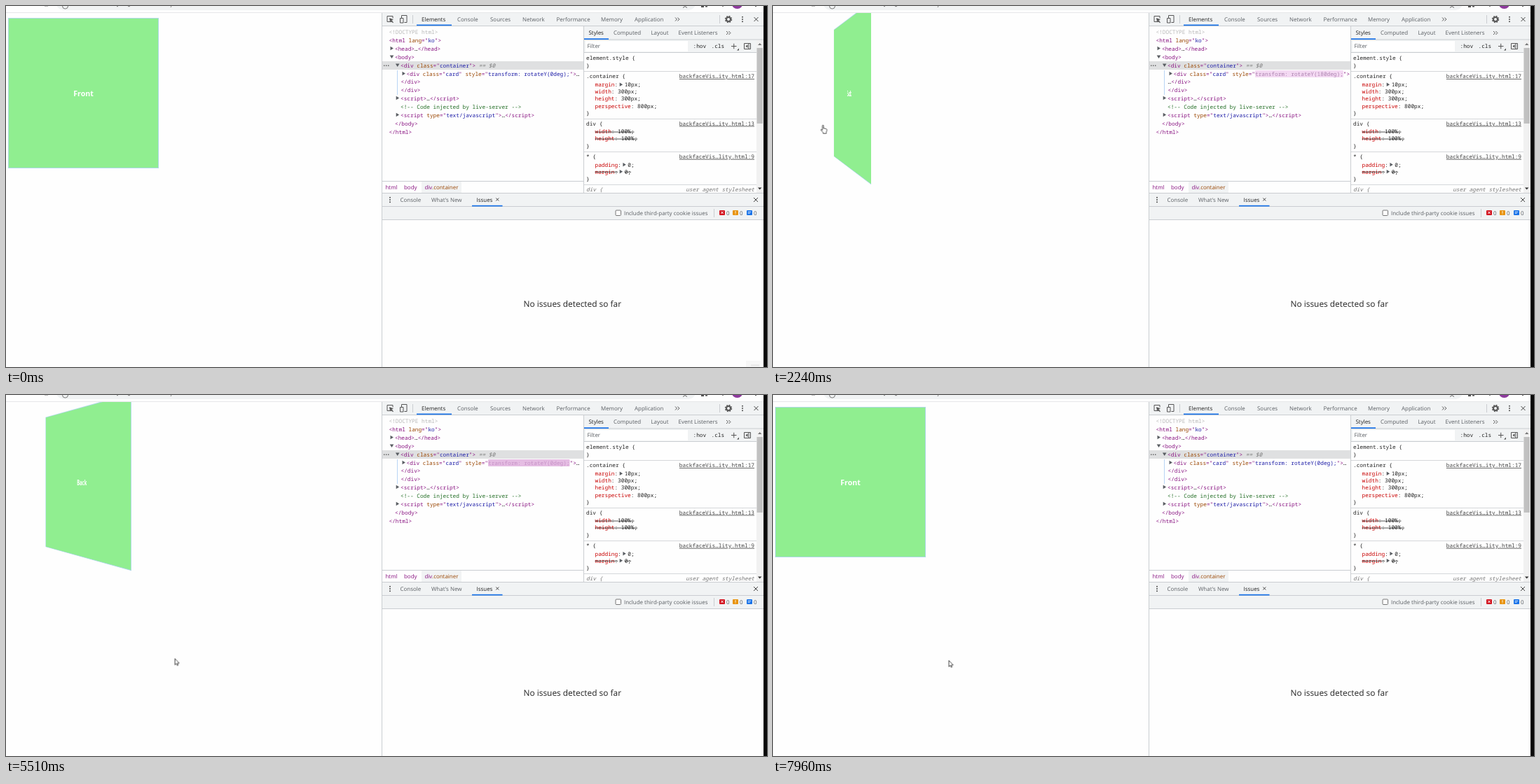
An HTML page for the animation above (8 s loop, 1086 by 516 pixels).

```html
<!DOCTYPE html>
<html lang="en">
<head>
<meta charset="utf-8">
<title>Card flip</title>
<style>
  html, body { margin: 0; width: 100%; height: 100%; overflow: hidden; background: #fefefe; }
  #page { position: absolute; left: 0; top: 9px; width: 536px; height: 507px; overflow: hidden;
    perspective: 573px; perspective-origin: 109px 115.5px; }
  #card { position: absolute; left: 3px; top: 8px; width: 215px; height: 215px;
    transform-origin: 106px 107.5px; transform-style: preserve-3d; }
  .face { position: absolute; inset: 0; box-sizing: border-box; border: 1px solid #add8e6;
    background: #90ee90; color: #fff; text-align: center; backface-visibility: hidden;
    font: bold 10.6px/215px "Open Sans", "Noto Sans", sans-serif; }
  .back { transform: rotateY(180deg); }
  svg { position: absolute; left: 0; top: 0; }
  text { white-space: pre; text-rendering: geometricPrecision; }
  .ui { font: 7.95px "Open Sans", "Noto Sans", sans-serif; fill: #5a5e63; }
  .mono { font: 7.78px "Noto Sans Mono", "DejaVu Sans Mono", monospace; fill: #222; }
  .tag { fill: #881280; } .attr { fill: #994500; } .val { fill: #1a1aa6; }
  .note { fill: #236e25; } .dim { fill: #b8b8b8; } .prop { fill: #c80000; }
  .gray { fill: #777; font-style: italic; }
  .link { text-decoration: underline; fill: #444; }
  .off { text-decoration: line-through; }
  .dark { fill: #222; }
</style>
</head>
<body>
<div id="page">
  <div id="card"><div class="face">Front</div><div class="face back">Back</div></div>
</div>
<svg id="ui" width="1086" height="516" viewBox="0 0 1086 516"></svg>
<svg id="pointer" width="1086" height="516" viewBox="0 0 1086 516">
  <g id="cursor" stroke="#222" stroke-width=".8" stroke-linejoin="round" fill="#fff">
    <path id="arrow" d="M.5 .5V9.3L2.5 7.5 3.8 10.3 5.1 9.7 3.9 7H6.6Z"/>
    <path id="hand" d="M2 1.2C2-.1 3.7-.1 3.7 1.2V5L5 4.9 6.3 5.3 7.5 5.7C8.4 6 8.5 6.6 8.4 7.6L7.6 10.4V12.2H3V10.7L.2 7.8C-.7 6.5.5 6 1.2 6.8L2 7.6Z"/>
  </g>
</svg>
<script>
const LOOP = 8000, STEP = 68.1;
const TO_BACK = 1245, TO_FRONT = 4895, TURN = 3000;
const SWAP = [1285, 4940];
const $ = id => document.getElementById(id);

const rect = (x, y, w, h, fill, extra = '') =>
  `<rect x="${x}" y="${y}" width="${w}" height="${h}" fill="${fill}" ${extra}/>`;
const path = (d, stroke = '#5a5e63', extra = '') =>
  `<path d="${d}" fill="none" stroke="${stroke}" ${extra}/>`;
const fill = (d, color = '#5a5e63') => `<path d="${d}" fill="${color}"/>`;
const text = (cls, x, y, s, extra = '') => `<text class="${cls}" x="${x}" y="${y}" ${extra}>${s}</text>`;
const span = (cls, s) => `<tspan class="${cls}">${s}</tspan>`;
const esc = s => s.replace(/</g, '&lt;').replace(/>/g, '&gt;');
const ui = (x, mid, s, cls = '') => text('ui ' + cls, x, mid + 2.8, s);
const mono = (x, mid, s, cls = '') => text('mono ' + cls, x, mid + 2.6, s);
const tag = s => span('tag', esc(s));
const attr = (name, value) => span('attr', name) + tag('="') + span('val', value) + tag('"');
const hline = (x, y, w, c = '#cacdd1') => rect(x, y, w, 1, c);
const vline = (x, y, h, c = '#cacdd1') => rect(x, y, 1, h, c);
const right = (x, y) => fill(`M${x - 2} ${y - 2.8}l4.4 2.8 -4.4 2.8z`);
const down = (x, y) => fill(`M${x - 2.8} ${y - 2}h5.6l-2.8 4.4z`);
const cross = (x, y, r) => path(`M${x - r} ${y - r}l${2 * r} ${2 * r}m0 ${-2 * r}l${-2 * r} ${2 * r}`, '#444');
const dots = (x, y) => [-3.2, 0, 3.2].map(d => `<circle cx="${x}" cy="${y + d}" r=".95" fill="#444"/>`).join('');
const more = (x, y) => path(`M${x - 3} ${y - 2.5}l2.5 2.5 -2.5 2.5m3.4 -5l2.5 2.5 -2.5 2.5`, '#444', 'stroke-width=".9"');
const BAR = '#f1f3f4', BLUE = '#1a73e8';

function browserBar() {
  return rect(0, 0, 1081, 9, '#fefefe')
    + rect(72, -14, 912, 20, BAR, 'rx="10"')
    + '<circle cx="84.5" cy="0" r="4" fill="none" stroke="#777"/>'
    + path('M55 0h5M158 .6h2M174 .6h3M236 0l-1 2', '#888')
    + path('M966 2.5l3 -2 3 2', '#666')
    + fill('M992 0h4v2h-4zM998 0h3v1.5h-3z', '#555')
    + '<circle cx="1043.5" cy="-4" r="8" fill="#8e3a9d"/>'
    + rect(1022, 0, 2, 1, '#888') + rect(1069, 0, 2, 1, '#666')
    + hline(0, 9, 1081, '#e6e7e9');
}

function mainBar() {
  const tabs = [[593, 'Elements', 'dark'], [644, 'Console'], [691, 'Sources'], [737, 'Network'],
    [785.5, 'Performance'], [849, 'Memory'], [897, 'Application']];
  return rect(536, 10, 545, 506, '#fefefe') + rect(536, 10, 545, 18, BAR) + hline(536, 28, 545)
    + tabs.map(([x, s, c]) => ui(x, 19, s, c)).join('')
    + rect(586, 26.5, 50, 1.7, BLUE)
    + path('M551 22.5h-7v-8h8v3', '#555') + fill('M547 17l6 2.5 -2.5 1 2.5 3 -1 .8 -2.5 -3 -1.4 2z', '#555')
    + path('M564.5 17v-3.5h7.5v10h-3.5M562.5 17.5h4.5v6.5h-4.5z', '#555')
    + vline(580, 13, 12) + more(958, 19) + vline(1018, 13, 12)
    + '<circle cx="1031" cy="19" r="3" fill="none" stroke="#555" stroke-width="2"/>'
    + '<circle cx="1031" cy="19" r="4.5" fill="none" stroke="#555" stroke-width="1.4" stroke-dasharray="2 1.534"/>'
    + dots(1051, 19) + cross(1070.5, 19, 3);
}

// The card's row in the tree, with a highlight that fades after each change
function cardRow(id, deg, boxWidth, tail, next) {
  return `<g id="${id}">` + `<rect class="glow" x="688" y="92" width="${boxWidth}" height="10" rx="1" fill="transparent"/>`
    + mono(571.5, 97, tag('<div ') + attr('class', 'card') + ' ' + span('attr', 'style') + tag('="')
      + `<tspan class="val live">transform: rotateY(${deg}deg);</tspan>` + tag('">') + tail)
    + mono(563.5, 108.5, next + tag('</div>')) + '</g>';
}

function tree() {
  const dots3 = '…';
  return rect(537, 79, 287, 12, '#dfe0e1') + vline(558, 92, 35, '#b9d5f5')
    + mono(546.5, 37, esc('<!DOCTYPE html>'), 'dim')
    + mono(546.5, 49, tag('<html ') + attr('lang', 'ko') + tag('>'))
    + right(550.5, 60.5) + mono(555, 61, tag('<head>') + dots3 + tag('</head>'))
    + down(550.5, 72.5) + mono(555, 73, tag('<body>'))
    + [539, 542, 545].map(x => rect(x, 84.5, 1.4, 1.4, '#555')).join('')
    + down(558.7, 84.5) + mono(563, 85, tag('<div ') + attr('class', 'container') + tag('>') + span('gray', ' == $0'))
    + right(567.5, 96.5)
    + cardRow('front', 0, 116.5, dots3, '')
    + cardRow('back', 180, 126, '', dots3)
    + mono(563.5, 120.3, tag('</div>'))
    + right(558.7, 131.5) + mono(563, 132.2, tag('<script>') + dots3 + tag('<\/script>'))
    + mono(563, 144.3, esc('<!-- Code injected by live-server -->'), 'note')
    + right(558.7, 155.5) + mono(563, 156.3, tag('<script ') + attr('type', 'text/javascript') + tag('>') + dots3 + tag('<\/script>'))
    + mono(555, 168.4, tag('</body>')) + mono(546.5, 180.4, tag('</html>'))
    + hline(537, 250, 287) + rect(593, 251, 57, 16, BAR)
    + ui(541.5, 259.3, 'html', 'tag') + ui(568, 259.3, 'body', 'tag')
    + ui(597.5, 259.3, span('tag', 'div') + span('attr', '.container'));
}

function styles() {
  const prop = (y, name, value, off, arrow) => {
    const cls = off ? 'off' : '', x = 840.5;
    if (!arrow) return mono(x, y, span('prop', name) + ': ' + value + ';', cls);
    const end = x + (name.length + 1) * 4.67;
    return mono(x, y, span('prop', name) + ':', cls) + right(end + 4.5, y - .3) + mono(end + 9.5, y, value + ';', cls);
  };
  const link = (y, s) => mono(1068, y, s, 'link').replace('<text', '<text text-anchor="end"');
  const tabs = [[831.5, 'Styles', 'dark'], [867, 'Computed'], [920.5, 'Layout'], [959.5, 'Event Listeners']];
  return rect(825, 29, 256, 38, BAR) + vline(824, 29, 238) + hline(825, 47.5, 256) + hline(825, 66, 246)
    + tabs.map(([x, s, c]) => ui(x, 38.5, s, c)).join('') + more(1031, 38.5)
    + rect(825, 46.3, 35, 1.7, BLUE)
    + rect(827, 50, 146, 15, '#fff') + ui(829.5, 57.5, 'Filter')
    + mono(980.5, 57.3, ':hov', 'dark') + mono(1006.5, 57.3, '.cls', 'dark')
    + path('M1035 57.5h7.5m-3.75 -3.75v7.5', '#555') + fill('M1046 60.5v3h-3z', '#555')
    + path('M1053.5 53.5h9v8h-9zM1060 53.5v8', '#555') + fill('M1058.5 55v5l-3 -2.5z', '#555')
    + mono(828, 74, 'element.style {') + mono(828, 85, '}')
    + mono(828, 100.5, '.container {') + link(100.5, 'backfaceVis…ity.html:17')
    + prop(112.5, 'margin', '10px', 0, 1) + prop(122.6, 'width', '300px') + prop(132.8, 'height', '300px')
    + prop(143, 'perspective', '800px') + mono(828, 153, '}')
    + mono(828, 168, 'div {') + link(168, 'backfaceVis…ity.html:13')
    + prop(179.8, 'width', '100%', 1) + prop(189.8, 'height', '100%', 1) + mono(828, 200, '}')
    + mono(828, 215.2, '* {') + link(215.2, 'backfaceVis…lity.html:9')
    + prop(227, 'padding', '0', 0, 1) + prop(237, 'margin', '0', 1, 1) + mono(828, 247, '}')
    + mono(828, 262.3, 'div {', 'gray')
    + mono(1068, 262.3, 'user agent stylesheet', 'gray').replace('<text', '<text text-anchor="end"')
    + [93, 161, 208, 255].map(y => hline(825, y, 246, '#d5d7da')).join('')
    + rect(1071, 49, 10, 218, '#f1f1f1') + rect(1071.5, 60, 8.5, 108, '#c1c1c1')
    + fill('M1073 56h5.4l-2.7 -3z', '#777') + fill('M1073 259.5h5.4l-2.7 3z', '#333');
}

function drawer() {
  const badge = (x, c, shape) => rect(x, 292, 8, 7, c, 'rx="1"') + shape + ui(x + 10, 296, '0');
  return rect(537, 267, 544, 38.5, BAR) + hline(537, 267, 544) + hline(537, 286, 544) + hline(537, 305, 544)
    + dots(548, 277) + ui(562.5, 277, 'Console') + ui(607, 277, "What's New") + ui(671.5, 277, 'Issues', 'dark')
    + cross(701.3, 276.5, 2) + rect(665, 284.8, 43.5, 1.7, BLUE) + cross(1070, 277, 3)
    + rect(870, 292, 7.5, 7.5, '#fff', 'stroke="#777" rx="1"')
    + ui(882, 296, 'Include third-party cookie issues') + vline(1010, 290, 12)
    + badge(1018, '#d3131f', path('M1020.3 293.7l3.4 3.4m0 -3.4l-3.4 3.4', '#fff'))
    + badge(1037, '#e8930c', path('M1041 293.2v2.6m0 .8v1', '#fff'))
    + badge(1057, BLUE, path('M1058.7 294.3h4.6m-4.6 2h3', '#fff', 'stroke-width=".8"'))
    + text('dark', 738.5, 429.5, 'No issues detected so far', 'style="font:11.9px \'Open Sans\',\'Noto Sans\',sans-serif"')
    + '<g id="hint">' + rect(1056, 507, 21, 9, '#f7f7f7') + rect(1063, 512.5, 12, 2, '#e8e8e8') + '</g>';
}

$('ui').innerHTML = browserBar() + mainBar() + tree() + styles() + drawer()
  + vline(536, 10, 506) + rect(1081, 0, 5, 516, '#070707');

const anims = [];
// frames: [ms, css properties, easing]
function track(el, frames) {
  const keys = frames.map(([ms, css, easing = 'linear']) => ({ offset: ms / LOOP, easing, ...css }));
  const a = el.animate(keys, { duration: LOOP, fill: 'both' });
  a.pause();
  anims.push(a);
}

const turn = deg => ({ transform: `rotateY(${deg}deg)` });
track($('card'), [[0, turn(0)], [TO_BACK, turn(0), 'ease'], [TO_BACK + TURN, turn(180)],
  [TO_FRONT, turn(180), 'ease'], [TO_FRONT + TURN, turn(0)], [LOOP, turn(0)]]);

function glow(id, at) {
  const box = document.querySelector(`#${id} .glow`), live = document.querySelector(`#${id} .live`);
  const f = c => ({ fill: c });
  track(box, [[0, f('rgba(245,219,244,0)')], [at, f('rgba(245,219,244,0)')], [at, f('rgb(158,54,153)'), 'ease'],
    [at + 1120, f('rgb(245,219,244)'), 'ease'], [at + 1400, f('rgba(245,219,244,0)')], [LOOP, f('rgba(245,219,244,0)')]]);
  track(live, [[0, f('#1a1aa6')], [at, f('#1a1aa6')], [at, f('#fff')], [at + 480, f('rgb(203,148,203)')],
    [at + 1120, f('rgb(160,122,165)'), 'ease'], [at + 1400, f('#1a1aa6')], [LOOP, f('#1a1aa6')]]);
}
glow('back', SWAP[0]);
glow('front', SWAP[1]);

const route = [[0, 1060, 540], [410, 1060, 540], [470, 988, 506], [610, 705, 420], [750, 445, 352], [890, 250, 305],
  [1030, 120, 275], [1160, 58, 250], [1226, 53, 224], [1294, 68, 180], [1362, 68.5, 170], [4835, 68.5, 170],
  [4903, 91, 208], [4971, 104, 240], [5110, 140, 300], [5300, 205, 355], [5500, 240, 376], [5640, 245, 379],
  [7950, 245, 379], [7960, 250.5, 379], [LOOP, 250.5, 379]];
track($('cursor'), route.map(([ms, x, y]) => [ms, { transform: `translate(${x}px, ${y}px)` }]));

const show = (id, on) => { $(id).style.visibility = on ? 'visible' : 'hidden'; };

function draw(now) {
  const t = Math.floor((now % LOOP + 16) / STEP) * STEP;
  anims.forEach(a => { a.currentTime = Math.min(t, LOOP - 1); });
  const flipped = t >= SWAP[0] && t < SWAP[1];
  const pointing = t >= 1220 && t < 4930;
  show('back', flipped);
  show('front', !flipped);
  show('hand', pointing);
  show('arrow', !pointing);
  show('hint', t < STEP);
}

let start;
function tick(now) {
  start ??= now;
  draw(now - start);
  requestAnimationFrame(tick);
}
draw(0);
requestAnimationFrame(tick);
</script>
</body>
</html>
```
